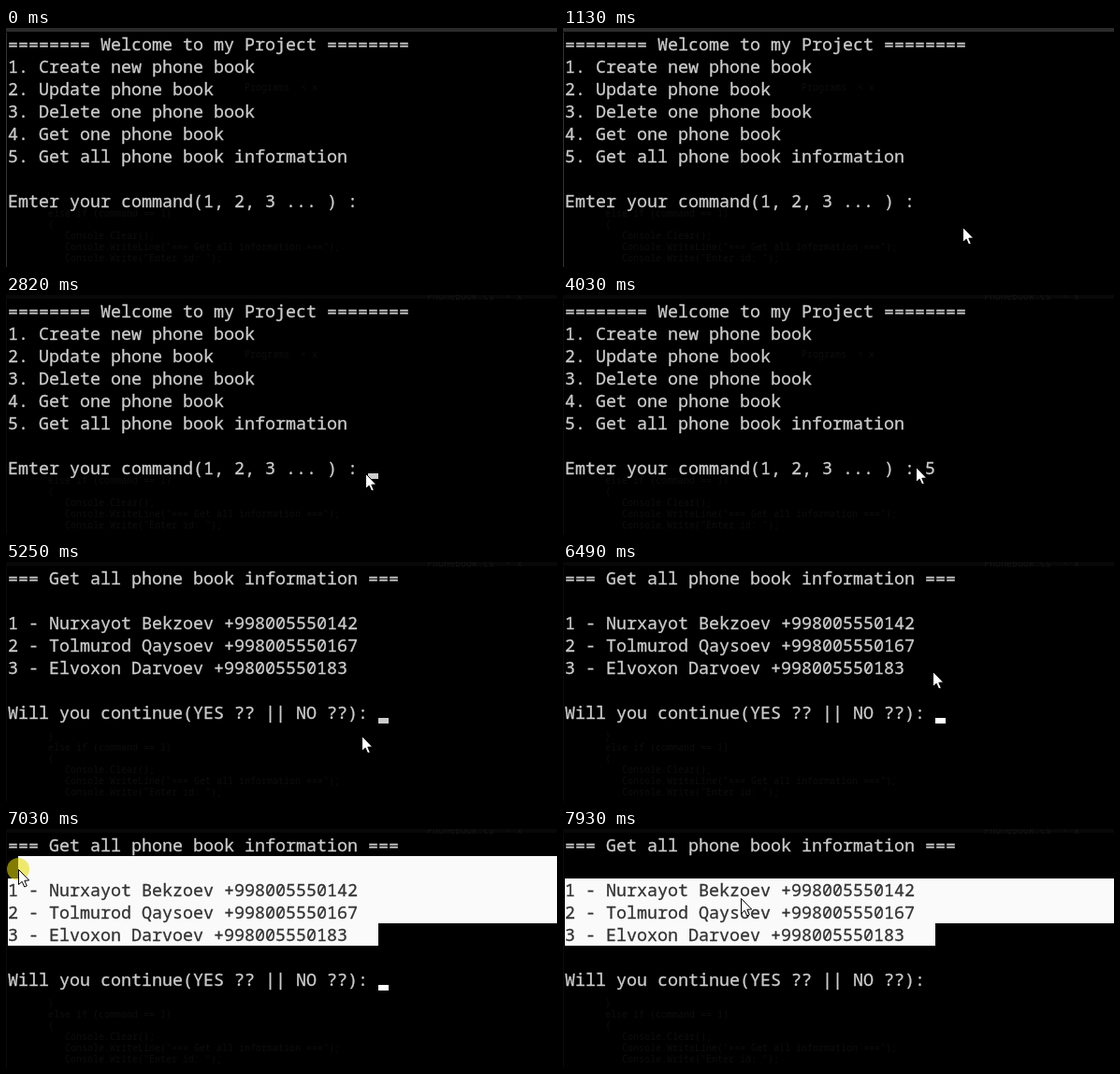
Write an HTML page with a canvas that moves like this. It is 589 by 256 pixels and loops after 8 s.

```html
<!DOCTYPE html>
<html lang="en">
<head>
<meta charset="utf-8">
<title>Phone book console</title>
<style>
  html, body { margin: 0; width: 100%; height: 100%; overflow: hidden; background: #000; }
  canvas { display: block; width: 589px; height: 256px; }
</style>
</head>
<body>
<canvas id="stage" width="589" height="256"></canvas>
<script>
const ctx = document.getElementById('stage').getContext('2d');
const W = 589, H = 256, LOOP = 8000;
const LEFT = 2, TOP = 5, CELL = 11, ROW = 24, BLINK = 530;
const MONO = '"Noto Sans Mono", "DejaVu Sans Mono", monospace';

const FOCUS = 1930, TYPED = 4030, ENTER = 4630;
const PRESS = 6560, RELEASE = 7520, COPIED = 7930;
const ANCHOR = { row: 4, col: 35 };

const menu = [
  '======== Welcome to my Project ========',
  '1. Create new phone book',
  '2. Update phone book',
  '3. Delete one phone book',
  '4. Get one phone book',
  '5. Get all phone book information',
  '',
  'Emter your command(1, 2, 3 ... ) : '
];
const listing = [
  '=== Get all phone book information ===',
  '',
  '1 - Nurxayot Bekzoev +998005550142',
  '2 - Tolmurod Qaysoev +998005550167',
  '3 - Elvoxon Darvoev +998005550183',
  '',
  'Will you continue(YES ?? || NO ??): '
];
const editor = [
  '}',
  'else if (command == 1)',
  '{',
  '   Console.Clear();',
  '   Console.WriteLine("=== Get all information ===");',
  '   Console.Write("Enter id: ");'
];

// Each move ends at (x, y); bend pushes its middle off the straight line
const entry = { x: 433, y: 246 };
const moves = [
  { start: 590, end: 870, x: 427, y: 213 },
  { start: 1130, end: 1670, x: 418, y: 182 },
  { start: 2400, end: 3020, x: 377, y: 184, bend: [-4, 11] },
  { start: 5180, end: 6020, x: 436, y: 167, bend: [35, 30] },
  { start: 6130, end: 6490, x: 395, y: 117 },
  { start: PRESS, end: 6960, x: 13, y: 43 },
  { start: 7100, end: RELEASE, x: 2, y: 58 },
  { start: 7690, end: COPIED, x: 190, y: 74 }
];

const ease = k => k * k * (3 - 2 * k);

function pointerAt(t) {
  let { x, y } = entry;
  for (const move of moves) {
    if (t < move.start) break;
    const k = ease(Math.min(1, (t - move.start) / (move.end - move.start)));
    const [bx, by] = move.bend || [0, 0];
    const arch = Math.sin(Math.PI * k);
    x += (move.x - x) * k + bx * arch;
    y += (move.y - y) * k + by * arch;
  }
  return { x: Math.round(x), y: Math.round(y) };
}

function box(x, y, w, h, color) {
  ctx.fillStyle = color;
  ctx.fillRect(x, y, w, h);
}

function drawLines(lines, color) {
  ctx.font = `18.333px ${MONO}`;
  ctx.fillStyle = ctx.strokeStyle = color;
  ctx.lineWidth = 0.3;
  lines.forEach((line, i) => {
    const y = TOP + 19 + i * ROW;
    ctx.fillText(line, LEFT, y);
    ctx.strokeText(line, LEFT, y);
  });
}

// Dim editor window showing through the console
function drawBackdrop(focused) {
  box(0, 0, W, H, '#000');
  box(0, 0, W, 4, focused ? '#080808' : '#2b2b2b');
  box(0, 5, 1, H - 5, focused ? '#0c0c0c' : '#333');
  ctx.font = `10px ${MONO}`;
  ctx.fillStyle = '#0d0d0d';
  ctx.fillText('Programs  < x', 255, 67);
  editor.forEach((line, i) => ctx.fillText(line, 45, 190 + i * 12));
  if (focused) {
    ctx.fillStyle = '#151515';
    ctx.fillText('PhoneBook.cs  < x', 450, 5);
  }
}

function drawSelection(t, lines) {
  const { x, y } = pointerAt(Math.min(t, RELEASE));
  const firstRow = Math.floor((y - TOP) / ROW);
  const firstCol = Math.max(0, Math.floor((x - LEFT) / CELL));
  ctx.save();
  ctx.beginPath();
  for (let row = firstRow; row <= ANCHOR.row; row++) {
    const left = LEFT + (row === firstRow ? firstCol * CELL : 0);
    const right = row === ANCHOR.row ? LEFT + (ANCHOR.col + 1) * CELL : W;
    ctx.rect(left, TOP + row * ROW, right - left, ROW);
  }
  ctx.clip();
  box(0, 0, W, H, '#fafafa');
  drawLines(lines, '#333');
  ctx.restore();
}

// Selecting text holds the caret visible
function drawCaret(t) {
  if (t >= TYPED && t < ENTER) return;
  const lines = t < ENTER ? menu : listing;
  const age = t - (t < ENTER ? 2440 : 5250);
  const lit = t >= PRESS ? t < COPIED : age >= 0 && Math.floor(age / BLINK) % 2 === 0;
  if (!lit) return;
  const row = lines.length - 1;
  box(LEFT + lines[row].length * CELL, TOP + (row + 1) * ROW - 6, CELL, 6,
    age < BLINK ? '#ccc' : '#fff');
}

function drawPointer({ x, y }, pressed) {
  if (pressed) {
    ctx.fillStyle = 'rgba(228,220,0,.57)';
    ctx.beginPath();
    ctx.arc(x, y, 12, 0, Math.PI * 2);
    ctx.fill();
  }
  ctx.save();
  ctx.translate(x + 0.5, y + 0.5);
  ctx.beginPath();
  [[0, 0], [0, 16], [3.7, 12.8], [6.2, 18.5], [8.8, 17.4], [6.3, 11.8], [11.2, 11.5]]
    .forEach(([px, py]) => ctx.lineTo(px, py));
  ctx.closePath();
  ctx.fillStyle = '#fff';
  ctx.strokeStyle = '#000';
  ctx.lineWidth = 1;
  ctx.fill();
  ctx.stroke();
  ctx.restore();
}

function draw(t) {
  let lines = menu;
  if (t >= ENTER) lines = listing;
  else if (t >= TYPED) lines = [...menu.slice(0, -1), menu[menu.length - 1] + '5'];

  drawBackdrop(t >= FOCUS);
  drawLines(lines, '#ccc');
  if (t >= PRESS) drawSelection(t, lines);
  drawCaret(t);

  const pressed = (t >= FOCUS && t < 2070) || (t >= PRESS && t < RELEASE);
  if (t >= moves[0].start) drawPointer(pointerAt(t), pressed);
}

const began = performance.now();
function tick() {
  draw((performance.now() - began) % LOOP);
  requestAnimationFrame(tick);
}
tick();
</script>
</body>
</html>
```
